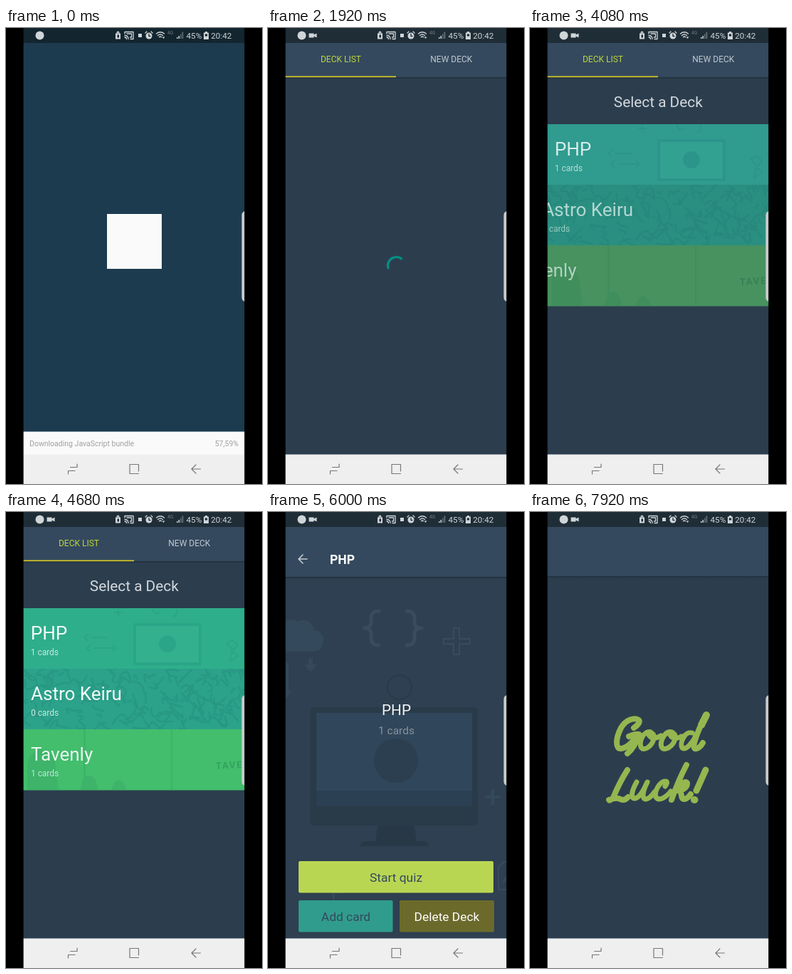
Recreate the animation shown at these times as an HTML page. Size 360 px wide and 640 px high, loop 8000 ms.

```html
<!DOCTYPE html>
<html lang="en">
<head>
<meta charset="utf-8">
<title>Flash card decks</title>
<style>
  html, body { margin: 0; width: 100%; height: 100%; overflow: hidden; background: #000; }
  #stage { display: block; width: 360px; height: 640px; font-family: Roboto, sans-serif; }
  .line { fill: none; stroke-linecap: round; stroke-linejoin: round; }
  .mid { text-anchor: middle; }
  .title { font-size: 26px; fill: #f4faf8; }
  .sub { font-size: 11.9px; fill: #c9e8df; }
  .button { font-size: 17.4px; text-anchor: middle; }
  #luck { transform-origin: 180.5px 345px; }
  #spin { transform-origin: 180.5px 333.5px; }
</style>
</head>
<body>
<svg id="stage" viewBox="0 0 360 640">
  <defs>
    <linearGradient id="shade" x2="0" y2="1">
      <stop stop-color="#1b2835" stop-opacity=".7"/>
      <stop offset="1" stop-color="#1b2835" stop-opacity="0"/>
    </linearGradient>
    <clipPath id="middleRow"><rect x="24" y="220" width="312" height="85"/></clipPath>
  </defs>
  <rect width="360" height="640"/>
  <rect x="24" width="312" height="640" fill="#2c3e4e"/>
  <rect x="24" width="312" height="21" fill="#1f2d37"/>

  <g id="home">
    <rect x="24" y="21" width="312" height="48" fill="#34495e"/>
    <rect x="24" y="69" width="312" height="3" fill="url(#shade)"/>
    <rect x="24" y="67.500" width="156" height="1.700" fill="#d9cb28"/>
    <g class="mid" font-size="12">
      <text x="102.5" y="47.5" fill="#bdd53c">DECK LIST</text>
      <text x="257.8" y="47.5" fill="#c0c8ce">NEW DECK</text>
    </g>
    <g id="loader">
      <g id="spin"><circle id="arc" class="line" cx="180.5" cy="333.5" r="12" pathLength="100"
        stroke="#009688" stroke-width="3" style="stroke-linecap:butt"/></g>
    </g>

    <g id="list">
      <text class="mid" x="180.3" y="110.700" font-size="20.8" fill="#d3d9dd">Select a Deck</text>
      <g id="rows">
        <rect id="fill1" x="24" y="135" width="312" height="85.5"/>
        <g id="picture1" fill="#1d7f7c" opacity=".17">
          <rect x="179" y="156" width="96" height="59" rx="2"/>
          <rect x="183" y="160" width="88" height="51" fill="#4bc3a8"/>
          <circle cx="227" cy="185" r="12"/>
          <path class="line" stroke="#1d7f7c" stroke-width="2" d="M115 172l-5 4 5 4M120 176h22M118 187l-4 4 4 4M124 191h26M150 187l4 4-4 4M153 141h10M158 137v9M206 137q5 9 10 4M240 137q2 8 -5 10M310 184l8-4 8 6-6 8zM318 196l9 6-12 8z"/>
        </g>
        <g id="body1">
          <g id="label1"><text class="title" x="34.800" y="179">PHP</text><text class="sub" x="34.800" y="201">1 cards</text></g>
        </g>
        <g id="lower">
          <rect id="fill2" x="24" y="220" width="312" height="85.5"/>
          <g clip-path="url(#middleRow)"><path id="swirls" class="line" stroke="#145f66" stroke-opacity=".15" stroke-width="2.5"/></g>
          <g id="label2"><text class="title" x="35" y="263.5">Astro Keiru</text><text class="sub" x="35" y="286">0 cards</text></g>
          <rect id="fill3" x="24" y="305" width="312" height="85.5"/>
          <g fill="#1d7750" opacity=".13">
            <path d="M30 390v-38q4-16 19-19 17 4 20 19l5 38z"/>
            <path d="M109 305h3v85h-3zM232 305h2v85h-2zM105 390q2-20 12-20t12 20zM148 390q4-14 11-14t10 14z"/>
          </g>
          <text x="295" y="361" font-size="13.500" font-weight="700" letter-spacing="1.5" fill="#0b5138" opacity=".25" transform="rotate(-3 295 361)">TAVE</text>
          <g id="label3"><text class="title" x="35" y="348.5">Tavenly</text><text class="sub" x="35" y="371">1 cards</text></g>
        </g>
      </g>
    </g>
  </g>

  <g id="deck">
    <rect x="24" y="21" width="312" height="579" fill="#2e4051"/>
    <g fill="#34495b">
      <path d="M24 153q10-4 18 1 17-8 23 12 13 1 13 15 0 14-15 15H24z"/>
      <path d="M57 205h6v9h6l-9 11-9-11h6zM25 212h4v39h5l-9 11z"/>
      <path d="M314 389h4v9h9v4h-9v9h-4v-9h-9v-4h9z"/>
    </g>
    <g class="line" stroke="#384c5e" stroke-width="5">
      <path d="M156 139q-11 0-11 10v6q0 8-10 8 10 0 10 8v6q0 10 11 10M195 139q11 0 11 10v6q0 8 10 8-10 0-10 8v6q0 10-11 10"/>
      <g stroke-width="2"><path d="M261 163h8v15h15v7h-15v15h-8v-15h-14v-7h14z"/>
      <circle cx="185" cy="246" r="17" stroke="#293a4a"/>
      <path d="M340 491h-9l-7 8v31h16M331 520l8-14M92 546v-12h14"/></g>
    </g>
    <path d="M155 438h50l4 24h11q6 2 6 7H130q0-5 6-7h15z" fill="#283847"/>
    <rect x="60" y="274" width="235" height="166" rx="5" fill="#293a49"/>
    <rect x="68" y="282" width="219" height="131" fill="#30465b"/>
    <rect x="68" y="391" width="219" height="22" fill="#2c4053"/>
    <circle cx="180" cy="349" r="31" fill="#2b3f51"/>
    <rect x="24" y="21" width="312" height="70" fill="#34495e"/>
    <rect x="24" y="91" width="312" height="3" fill="url(#shade)"/>
    <path class="line" d="M55 66H43M49 60l-6 6 6 6" stroke="#c5ccd2" stroke-width="1.6"/>
    <text x="87" y="73" font-size="17.5" font-weight="700" fill="#fff">PHP</text>
    <text class="mid" x="180.5" y="285" font-size="20.8" fill="#f2f4f5">PHP</text>
    <text class="mid" x="180.5" y="312" font-size="15.5" fill="#87929a">1 cards</text>
    <g class="button">
      <rect id="start" x="43" y="490" width="274" height="44.5" rx="2" fill="#b9d653"/>
      <rect x="43" y="545" width="132.5" height="44.5" rx="2" fill="#309c8e"/>
      <rect x="185" y="545" width="133" height="44.5" rx="2" fill="#6b6a2b"/>
      <text x="180" y="518.5" fill="#34495e">Start quiz</text>
      <text x="109.5" y="573.5" fill="#34495e">Add card</text>
      <text x="251.5" y="573.5" fill="#fff">Delete Deck</text>
    </g>
  </g>

  <g id="quiz">
    <rect x="24" y="21" width="312" height="579" fill="#2c3e4e"/>
    <rect x="24" y="21" width="312" height="69" fill="#34495e"/>
    <rect x="24" y="90" width="312" height="3" fill="url(#shade)"/>
    <g id="luck" class="line" stroke="#96b650" stroke-width="8" role="img" aria-label="Good Luck!">
      <path d="M146 303q10-7 7-11C147 288 135 291 128 303C120 318 120 333 128 332C137 331 146 322 149 313M139 315Q148 311 153 312Q148 330 137 339"/>
      <path d="M170 309C160 306 153 322 156 330C160 337 173 328 174 317C175 310 170 309 167 313Q172 321 184 314" stroke-width="7"/>
      <path d="M200 309C190 306 182 322 185 330C189 337 203 328 204 317C205 310 200 309 197 313Q202 321 213 315" stroke-width="7"/>
      <path d="M228 310C218 307 210 324 214 331C219 336 230 322 234 312" stroke-width="7"/>
      <path d="M248 285Q237 303 231 324Q229 333 234 332Q239 331 243 324"/>
      <path d="M248 285L241 299" stroke-width="10"/>
      <path d="M137 362Q126 379 117 401Q112 406 111 404Q122 400 127 403Q133 406 138 400"/>
      <path d="M150 379C143 391 141 402 147 402C154 402 161 388 165 379C158 392 157 403 163 403Q169 402 175 393" stroke-width="7"/>
      <path d="M190 385Q195 378 190 378C183 378 174 392 177 400C181 407 192 400 198 392" stroke-width="7"/>
      <path d="M220 355Q208 378 199 404M205 391C212 379 222 376 221 382C220 388 213 391 208 391C216 392 210 403 217 403Q222 402 226 396"/>
      <path d="M247 362L234 391" stroke-width="9"/>
      <path d="M231 404h.5" stroke-width="10"/>
    </g>
  </g>

  <g id="splash">
    <rect x="24" width="312" height="600" fill="#1c3b4f"/>
    <rect x="24" width="312" height="21" fill="#13252f"/>
    <rect x="142" y="261" width="77" height="77" fill="#fafafa"/>
    <g id="progress">
      <rect x="24" y="566.500" width="312" height="33" fill="#fafafa"/>
      <g font-size="10.5" fill="#a0a0a0">
        <text x="33" y="587">Downloading JavaScript bundle</text>
        <text id="percent" x="327" y="587" text-anchor="end">57,59%</text>
      </g>
    </g>
  </g>

  <g fill="#cfd5d8">
    <circle cx="47.5" cy="10.5" r="6"/>
    <path id="camera" d="M57.500 7.5h7v2l4-2v6l-4-2v2h-7z"/>
    <path fill-rule="evenodd" d="M154 7.500h1.500q0-3 2-3t2 3h1.500v8h-7zM156.500 7.500h2q-1-2-2 0zM156.500 9.500v4h2.500v-4z"/>
    <rect x="186" y="8" width="5" height="5"/>
    <circle cx="201" cy="11" r="4.500"/>
    <path class="line" stroke="#cfd5d8" stroke-width="1.300" d="M211.500 8q5.500-4.500 11 0M213.500 10.500q3.500-3 7 0M215.500 12.800q1.500-1.500 3 0"/>
    <path d="M219.500 12.500h4l-2 2.500z"/>
    <path fill-rule="evenodd" d="M278 6.500h2v-1.500h3v1.500h2v9.500h-7zM279.800 8.500v3h3.400v-3z"/>
    <path d="M240 13h1.500v2h-1.500zM242.500 11h1.500v4h-1.500z"/>
    <path d="M245 8.500h1.500v6.500h-1.500zM247.500 5.500h1.800v9.500h-1.800z" opacity=".4"/>
    <text x="227" y="9" font-size="6.500" opacity=".5">4G</text>
    <g font-size="11.700"><text x="253.500" y="14.800">45%</text><text x="288.300" y="14.800">20:42</text></g>
    <g class="line" stroke="#cfd5d8" stroke-width="1.300">
      <path d="M167 8v-2.500h12v10h-4M167 10.500q5 0 5 5M167 13q2.500 0 2.500 2.500M170 8h6.500v5h-2"/>
      <path d="M196 7l2-2M206 7l-2-2"/>
      <path d="M201 8.500v3h2" stroke="#1f2d37"/>
    </g>
  </g>

  <rect x="24" y="598.500" width="312" height="42" fill="#efefef"/>
  <g class="line" stroke="#777" stroke-width="1.200">
    <path d="M90.500 616.500h9.500v-4.500M97 621.500h-9.500v4.500M87.500 621.500h9.500M183 625.500h-9v-13h12.500v9.500M186.500 625.500h-3.500M273.500 619h-12.500M267 613l-6 6 6 6"/>
  </g>
  <path d="M336 257q-4.500 1-4.500 6v115q0 5 4.500 6z" fill="#c9cdcf"/>
  <path d="M0 0h24.600v640H0zM335.300 0H360v640h-24.700z"/>
</svg>

<script>
const LOOP = 8000;
const $ = id => document.getElementById(id);

// Each step: [time in ms, properties, easing towards the next step]
function play(id, ...steps) {
  const all = [[0, steps[0][1]], ...steps, [LOOP, steps.at(-1)[1]]];
  const frames = all.map(([ms, props, easing = 'linear']) => ({ ...props, easing, offset: ms / LOOP }));
  return $(id).animate(frames, { duration: LOOP, iterations: Infinity });
}
const fade = (id, from, to, start = 0, end = 1) =>
  play(id, [from, { opacity: start }], [to, { opacity: end }]);
const moveX = x => ({ transform: `translateX(${x}px)` });
const moveY = y => ({ transform: `translateY(${y}px)` });

const clock = fade('splash', 640, 760, 1, 0);
fade('progress', 500, 500, 1, 0);
fade('camera', 760, 760);

// Loading ring: six grow-and-shrink cycles per loop
fade('loader', 3240, 3240, 1, 0);
play('spin', [0, { transform: 'rotate(176deg)' }], [LOOP, { transform: 'rotate(1976deg)' }]);
$('arc').animate([
  { strokeDasharray: '1 99', strokeDashoffset: 0 },
  { strokeDasharray: '75 25', strokeDashoffset: 0 },
  { strokeDasharray: '1 99', strokeDashoffset: -75 }
].map(f => ({ ...f, easing: 'cubic-bezier(.4,0,.2,1)' })),
{ duration: LOOP / 6, delay: -996, iterations: Infinity });
$('arc').setAttribute('transform', 'rotate(-90 180.5 333.5)');

// Deck list
fade('list', 3240, 3240);
const rows = [
  { early: '#309b8f', full: '#2eb589', rest: 3960, offset: 0 },
  { early: '#2a8f80', full: '#2ca98d', rest: 4320, offset: -18 },
  { early: '#47925f', full: '#40cf72', rest: 4500, offset: -57 }
];
rows.forEach(({ early, full, rest, offset }, i) => {
  const n = i + 1;
  play('fill' + n, [3240, { fill: '#2c3e4e' }], [4080, { fill: early }], [4920, { fill: full }]);
  const slide = offset
    ? [[3240, moveX(-310)], [4080, moveX(offset), 'ease-out'], [rest, moveX(0)]]
    : [[3240, moveX(-310), 'ease-out'], [rest, moveX(0)]];
  play('label' + n, ...slide);
  fade('label' + n, 3240, rest + 300, .2);
});
const growth = [[5040, 0], [5280, 32.5], [5520, 46]];
play('fill1', ...growth.map(([ms, g]) => [ms, { height: 85.5 + g + 'px' }]));
play('picture1', ...growth.map(([ms, g]) => [ms, moveY(g * .9)]));
play('body1', ...growth.map(([ms, g]) => [ms, moveY(g / 2)]));
play('lower', ...growth.map(([ms, g]) => [ms, moveY(g)]));

// Deck and quiz screens rise while fading in
function enter(id, from, to) {
  fade(id, from, to);
  play(id, [from, moveY(40), 'ease-out'], [to, moveY(0)]);
}
enter('deck', 5520, 5880);
play('start', [6120, { opacity: 1 }], [6240, { opacity: .6 }], [6400, { opacity: 1 }]);
enter('quiz', 6360, 6660);
play('luck',
  [6480, { transform: 'scale(0)', opacity: 0 }, 'ease-in'],
  [6840, { transform: 'scale(.19)', opacity: .15 }],
  [7560, { transform: 'scale(.86)', opacity: .8 }, 'ease-out'],
  [7900, { transform: 'scale(1)', opacity: 1 }]);

// Inky texture of the middle row
let seed = 7;
const rand = n => (seed = seed * 16807 % 2147483647) / 2147483647 * n;
const wobble = () => (rand(36) - 18).toFixed(1);
$('swirls').setAttribute('d', Array.from({ length: 150 }, () =>
  `M${25 + rand(310)} ${220 + rand(85)}q${wobble()} ${wobble()} ${wobble()} ${wobble()}`).join(''));

function tick() {
  const ms = (clock.currentTime || 0) % LOOP;
  const value = Math.min(100, 57.59 + Math.floor(ms / 60) * 5.87);
  $('percent').textContent = value.toFixed(2).replace('.', ',') + '%';
  requestAnimationFrame(tick);
}
tick();
</script>
</body>
</html>
```
